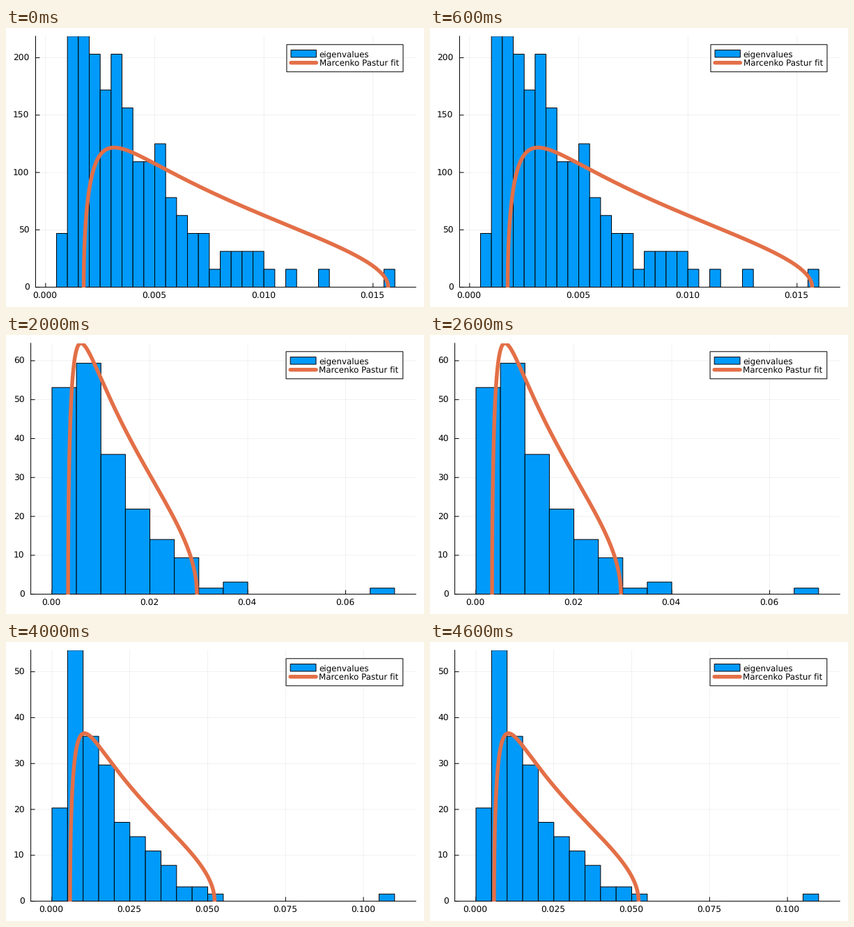
Write a matplotlib script that moves like this. It is 600 by 400 pixels and loops after 5000 ms.

```python
import numpy as np
import matplotlib.pyplot as plt
from matplotlib.animation import FuncAnimation
from matplotlib.patches import Rectangle

W, H, DPI = 600, 400, 100
PT = 72 / DPI  # points per pixel
BLUE, ORANGE = "#009afa", "#e36f47"
TOP, RIGHT, BOTTOM = 11.8, 588.2, 371.6
SAMPLES = 128
Q = 0.25  # aspect ratio of the random matrix

# left: plot edge, start/width: bins, scale: variance of the fitted law
STEPS = [
    dict(left=42.5, start=0.0005, width=0.0005, scale=0.006975,
         xstep=0.005, digits=3, ystep=50,
         counts=[3, 14, 14, 13, 11, 13, 10, 7, 7, 8, 5, 4, 3, 3, 1,
                 2, 2, 2, 2, 1, 0, 1, 0, 0, 1] + [0] * 5 + [1]),
    dict(left=42.5, start=0, width=0.002, scale=0.00899,
         xstep=0.01, digits=2, ystep=25,
         counts=[10, 31, 20, 18, 11, 8, 7, 6, 6, 3, 2, 2, 1, 0, 2]
         + [0] * 6 + [1]),
    dict(left=35.6, start=0, width=0.005, scale=0.01316,
         xstep=0.02, digits=2, ystep=10,
         counts=[34, 38, 23, 14, 9, 6, 1, 2] + [0] * 5 + [1]),
    dict(left=35.6, start=0, width=0.005, scale=0.0176,
         xstep=0.02, digits=2, ystep=10,
         counts=[22, 37, 22, 17, 11, 8, 5, 3, 1, 1] + [0] * 7 + [1]),
    dict(left=35.6, start=0, width=0.005, scale=0.0232,
         xstep=0.025, digits=3, ystep=10,
         counts=[13, 35, 23, 19, 11, 9, 7, 5, 2, 2, 1] + [0] * 10 + [1]),
]

# keep sub-pixel positions for lines and glyphs
plt.rcParams.update({"font.family": "DejaVu Sans", "path.snap": False,
                     "text.hinting": "none"})
fig = plt.figure(figsize=(W / DPI, H / DPI), dpi=DPI, facecolor="white")
ax = fig.add_axes([0, 0, 1, 1])


def marchenko_pastur(scale):
    a, b = scale * (1 - Q ** 0.5) ** 2, scale * (1 + Q ** 0.5) ** 2
    x = a + (b - a) * (1 - np.cos(np.linspace(0, np.pi, 400))) / 2
    root = np.sqrt(np.clip((b - x) * (x - a), 0, None))
    return x, root / (2 * np.pi * Q * scale * x)


def line(x, y, color="black", width=1, **kw):
    return ax.plot(x, y, color=color, lw=width * PT, **kw)[0]


def box(x0, y0, x1, y1, fill, z):
    return ax.add_patch(Rectangle((x0, y0), x1 - x0, y1 - y0, fc=fill,
                                  ec="black", lw=PT, zorder=z))


def label(x, y, text, ha, size=12.3, z=3):
    ax.text(x, y, text, ha=ha, va="baseline", fontsize=size * PT, zorder=z)


def draw_axes(s, to_x, to_y, xmax, ymax):
    left = s["left"]
    grid = dict(width=0.55, alpha=0.1, zorder=1)
    for k in range(int(xmax / s["xstep"]) + 1):
        value = k * s["xstep"]
        x = to_x(value)
        line([x, x], [TOP, BOTTOM], **grid)
        line([x, x], [BOTTOM, BOTTOM - 5.5], zorder=2)
        label(x - 0.8, 388, f"{value:.{s['digits']}f}", "center")
    for value in range(0, int(ymax) + 1, s["ystep"]):
        y = to_y(value)
        line([left, RIGHT], [y, y], **grid)
        line([left, left + 5.5], [y, y], zorder=2)
        label(left - 9, y + 4.4, str(value), "right")
    line([left, left], [TOP, BOTTOM], zorder=2)
    line([left, RIGHT], [BOTTOM, BOTTOM], zorder=2)


def draw_legend(left):
    span = RIGHT - left
    unit, right = span / 45, RIGHT - span / 30
    top, row = TOP + (BOTTOM - TOP) / 30, 13
    x = right - unit / 2 - 112.5
    y1, y2 = top + row, top + 2 * row
    box(x - 4 * unit, top, right, top + 3 * row, "white", 6)
    box(x - 3.5 * unit, y1 - 0.4 * row, x - unit / 2, y1 + 0.4 * row, BLUE, 7)
    line([x - 3.5 * unit, x - unit / 2], [y2, y2], ORANGE, 5.5,
         solid_capstyle="round", zorder=7)
    label(x - 1.7, y1 + 4.3, "eigenvalues", "left", 11.9, 8)
    label(x - 1.7, y2 + 4.3, "Marcenko Pastur fit", "left", 11.9, 8)


def draw(i):
    s = STEPS[i]
    ax.clear()
    ax.axis("off")
    ax.set(xlim=(0, W), ylim=(H, 0), autoscale_on=False)

    left, start, width = s["left"], s["start"], s["width"]
    heights = np.array(s["counts"]) / (SAMPLES * width)
    curve_x, curve_y = marchenko_pastur(s["scale"])
    ymax = max(heights.max(), curve_y.max())

    # the horizontal range is widened by 6 % twice
    bars_px = (RIGHT - left) / 1.06 ** 2
    x0 = (left + RIGHT - bars_px) / 2
    per_x = bars_px / (len(heights) * width)
    xmax = start + (RIGHT - x0) / per_x

    def to_x(v):
        return x0 + (v - start) * per_x

    def to_y(v):
        return BOTTOM - (BOTTOM - TOP) * v / ymax

    draw_axes(s, to_x, to_y, xmax, ymax)
    clip = Rectangle((left, TOP), RIGHT - left, BOTTOM - TOP,
                     transform=ax.transData)
    for k, h in enumerate(heights):
        if h:
            x = start + k * width
            bar = box(to_x(x), to_y(h), to_x(x + width), BOTTOM, BLUE, 4)
            bar.set_clip_path(clip)
    fit = line(to_x(curve_x), to_y(curve_y), ORANGE, 5.5,
               solid_capstyle="round", solid_joinstyle="round", zorder=5)
    fit.set_clip_path(clip)
    draw_legend(left)
    return []


anim = FuncAnimation(fig, draw, frames=len(STEPS), interval=1000, repeat=True)
plt.show()
```
